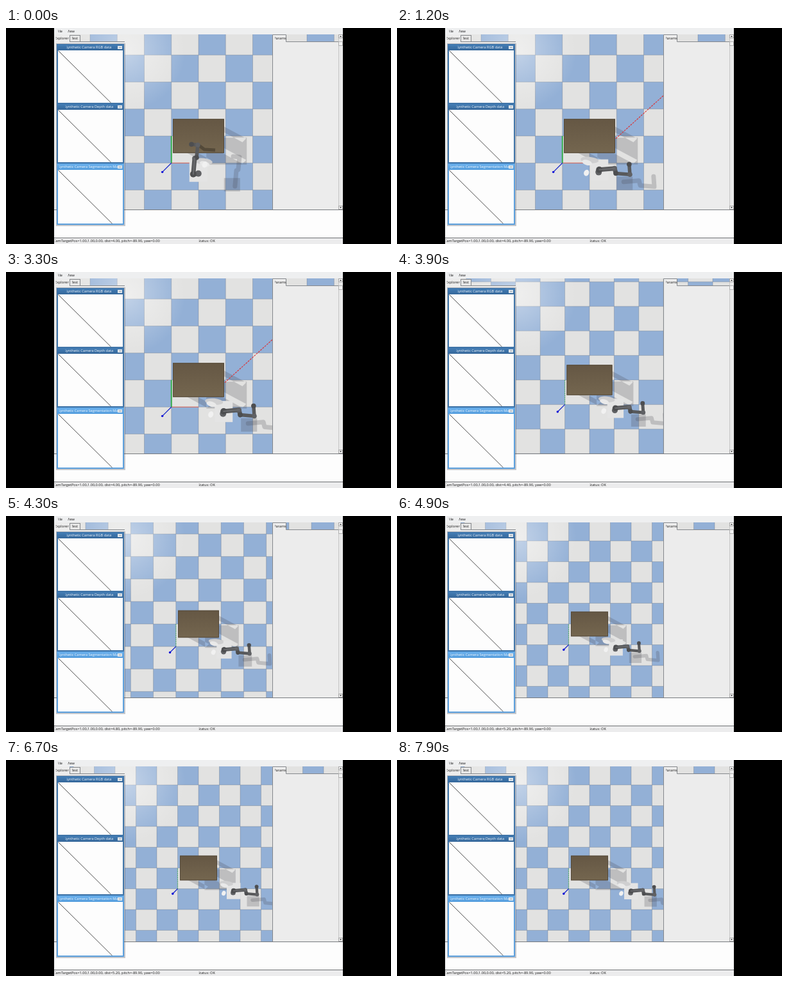
An HTML page with a canvas that plays this animation: 600x338 px, repeating every 8000 ms.

```html
<!DOCTYPE html>
<html lang="en">
<head>
<meta charset="utf-8">
<title>Robot simulation viewer</title>
<style>
html, body { margin: 0; width: 100%; height: 100%; overflow: hidden; background: #000; }
canvas { display: block; width: 600px; height: 338px; }
</style>
</head>
<body>
<canvas id="stage" width="600" height="338"></canvas>
<script>
const ctx = document.getElementById('stage').getContext('2d');
const LOOP = 8000, STEP = 100;
const CX = 300, CY = 169, FOCAL = 169;
const FONT = '"Open Sans", "Noto Sans", sans-serif';
const SHADE = 'rgba(70,72,78,0.23)';

// time, ground x, ground y of the robot base
const PATH = [
  [0, 0.9, -0.39], [1200, 1.337, -0.34], [3300, 1.905, -0.25], [4300, 2.11, -0.23],
  [5400, 2.35, -0.2], [6700, 2.66, -0.19], [7900, 2.97, -0.2], [8000, 2.99, -0.2]
];
// arm segments: length and angle in degrees, folded up and swung out
const ARM_UP = [[8, -187], [25, -85], [3, -18], [20, -84], [10, -174]];
const ARM_OUT = [[4, -76], [24, -5], [8, 76], [22, 5], [16, -94]];

let dist = 4;

const mix = (a, b, k) => a + (b - a) * k;
const clamp = v => Math.max(0, Math.min(1, v));

// looking straight down at ground point (1, 1)
function project(x, y, z = 0) {
  const s = FOCAL / (dist - z);
  return [CX + (x - 1) * s, CY - (y - 1) * s];
}

function rect(x, y, w, h, color) {
  ctx.fillStyle = color;
  ctx.fillRect(x, y, w, h);
}

function frame(x, y, w, h, color) {
  ctx.strokeStyle = color;
  ctx.lineWidth = 1;
  ctx.strokeRect(x + 0.5, y + 0.5, w - 1, h - 1);
}

function line(pts, color, width = 1, dash = []) {
  ctx.beginPath();
  pts.forEach(p => ctx.lineTo(p[0], p[1]));
  ctx.strokeStyle = color;
  ctx.lineWidth = width;
  ctx.setLineDash(dash);
  ctx.stroke();
  ctx.setLineDash([]);
}

function ellipse(x, y, rx, ry, color, turn = 0) {
  ctx.beginPath();
  ctx.ellipse(x, y, rx, ry, turn, 0, Math.PI * 2);
  ctx.fillStyle = color;
  ctx.fill();
}

// the toolkit cuts off the left part of the first letter
function label(str, x, y, color = '#1c1c1c', right = 525) {
  ctx.font = '5.6px ' + FONT;
  const first = ctx.measureText(str[0]).width;
  ctx.save();
  ctx.beginPath();
  ctx.rect(x - first * 0.45, y - 8, right - x + first, 12);
  ctx.clip();
  ctx.fillStyle = color;
  ctx.fillText(str, x - first, y);
  ctx.restore();
}

function zoomAt(t) {
  return Math.round(mix(4, 5.2, clamp((t - 3500) / 1200)) * 10) / 10;
}

function baseAt(t) {
  const i = PATH.findIndex((p, n) => n && t <= p[0]);
  const a = PATH[i - 1], b = PATH[i], k = (t - a[0]) / (b[0] - a[0]);
  return [mix(a[1], b[1], k), mix(a[2], b[2], k)];
}

function armPoints(k) {
  let x = mix(4, 0, k), y = 0;
  const pts = [[x, y]];
  ARM_UP.forEach((up, i) => {
    const len = mix(up[0], ARM_OUT[i][0], k);
    const a = mix(up[1], ARM_OUT[i][1], k) * Math.PI / 180;
    x += len * Math.cos(a);
    y += len * Math.sin(a);
    pts.push([x, y]);
  });
  return pts;
}

function drawFloor() {
  const s = FOCAL / dist;
  rect(75, 10, 450, 275, '#e2e2e1');
  for (let i = -6; i < 9; i++) {
    for (let j = -3; j < 7; j++) {
      const [x, y] = project(i, j + 1);
      if ((i + j) % 2) rect(x, y, s, s, '#93b0d6');
    }
  }
  for (let n = -6; n < 9; n++) {
    const [x, y] = project(n, n);
    line([[x, 10], [x, 285]], 'rgba(80,90,105,0.4)', 0.7);
    line([[75, y], [525, y]], 'rgba(80,90,105,0.4)', 0.7);
  }
  const glow = ctx.createRadialGradient(185, 35, 0, 185, 35, 95);
  glow.addColorStop(0, 'rgba(255,255,255,0.45)');
  glow.addColorStop(1, 'rgba(255,255,255,0)');
  rect(75, 10, 220, 125, glow);
}

function drawTableShadow() {
  const s = FOCAL / dist;
  const [x, y] = project(1.29, 0.94);
  ctx.beginPath();
  ctx.rect(x, y, 1.49 * s, s);
  const w = 0.07;
  for (const lx of [0.35, 1.65]) {
    for (const ly of [0.6, 1.4]) {
      const quad = [[lx - w, ly - w], [lx + 1.04 - w, ly - 0.56 - w],
        [lx + 1.04 + w, ly - 0.56 + w], [lx + w, ly + w]];
      quad.forEach((q, i) => ctx[i ? 'lineTo' : 'moveTo'](...project(...q)));
      ctx.closePath();
    }
  }
  ctx.fillStyle = SHADE;
  ctx.fill();
}

function drawAxes() {
  const o = project(0, 0);
  const far = dist > 4;
  if (!far) line([o, project(1, 0)], '#dc6055', 1.2);
  line([o, project(0, 1)], far ? '#55b070' : '#35ad4c', far ? 1.2 : 2, far ? [2, 1.3] : []);
  const tip = project(0, 0, 1);
  line([o, tip], '#1020c8', 1.2);
  ellipse(tip[0], tip[1], 1.7, 1.7, '#0808d8');
}

function drawTable(k) {
  const [x, y] = project(0.25, 1.5, 0.83);
  const [r, b] = project(1.75, 0.5, 0.83);
  const wood = ctx.createLinearGradient(x, y, x, b);
  wood.addColorStop(0, '#655744');
  wood.addColorStop(1, '#74664f');
  rect(x, y, r - x, b - y, wood);
  frame(x, y, r - x, b - y, '#554938');
  if (k < 0.5) {
    line([[301, 184], [309, 190], [326, 191]], 'rgba(30,25,20,0.35)', 5);
  }
}

function drawRobotBody(k) {
  const off = mix(3, 0, k);
  rect(off - 13, -20, 28, 33, '#e4e4e4');
  ellipse(mix(12, -14, k), -19, 14, 5, '#cfcfd0', 0.1);
  ellipse(mix(14, -18, k), -15, 8, 4, '#e9e9e9', 0.3);
  ellipse(mix(14, -19, k), mix(-14, 1, k), 4, 5, '#f1f1f1', 0.4);
}

function drawRobotShadow(pts, k) {
  rect(mix(44, 28, k), 7, 25, 21, SHADE);
  const dx = mix(65, 38, k), dy = 19;
  line(pts.slice(1).map(p => [p[0] + dx, p[1] + dy]), SHADE, 7);
}

function drawArm(pts) {
  const dark = '#58595b';
  line(pts.slice(0, 4), dark, 7);
  line(pts.slice(3), dark, 5.5);
  pts.forEach((p, i) => ellipse(p[0], p[1], i < 2 ? 5 : 3.8, i < 2 ? 5 : 3.8, i % 2 ? '#4d4e50' : '#606164'));
  line(pts.slice(1, 3), '#6b6c6f', 2);
}

function drawScene(t) {
  const swing = clamp(t / 1100);
  const k = swing * swing * (3 - 2 * swing);
  const [bx, by] = project(...baseAt(t));
  const pts = armPoints(k);
  const local = draw => {
    ctx.save();
    ctx.translate(bx, by);
    ctx.scale(4 / dist, 4 / dist);
    ctx.lineCap = ctx.lineJoin = 'round';
    draw();
    ctx.restore();
  };
  ctx.save();
  ctx.beginPath();
  ctx.rect(75, 10, 450, 274);
  ctx.clip();
  drawFloor();
  drawTableShadow();
  local(() => drawRobotShadow(pts, k));
  drawAxes();
  local(() => drawRobotBody(k));
  if (t >= 600 && t < 3500) line([[341, 173], [416, 105]], '#d8383c', 1.2, [3, 1.4]);
  drawTable(k);
  local(() => drawArm(pts));
  ctx.restore();
}

function drawWindow(y, h, title, textX, active) {
  const edge = active ? '#5b9fdd' : '#3f74a8';
  rect(79, y, 105, h, edge);
  const bar = ctx.createLinearGradient(0, y, 0, y + 10);
  bar.addColorStop(0, active ? '#6db2ee' : '#447fb8');
  bar.addColorStop(1, active ? '#519bdc' : '#35679a');
  rect(80, y + 1, 103, 9, bar);
  rect(81, y + 10, 101, h - 12, '#fdfdfd');
  line([[81.5, y + 10.5], [81.5 + h - 12, y + h - 2]], '#3a3a3a', 0.9);
  label(title, textX, y + 7.3, '#f4f8fc', 172);
  rect(174, y + 3, 7, 5, '#dfe5ea');
  line([[176, y + 5.5], [179.5, y + 5.5]], '#9aa4ae', 1);
}

function arrow(x, y, dir) {
  rect(518, y - 3, 7, 6, '#f6f6f6');
  frame(518, y - 3, 7, 6, '#a8a8a8');
  ctx.beginPath();
  ctx.moveTo(x - 1.6, y + dir);
  ctx.lineTo(x + 1.6, y + dir);
  ctx.lineTo(x, y - dir);
  ctx.fillStyle = '#333';
  ctx.fill();
}

function drawPanels() {
  const face = '#ececec', border = '#85888c';
  rect(75, 0, 450, 10, '#eeeff0');
  label('File', 82, 7);
  label('View', 98, 7);

  rect(75, 21, 110, 264, face);
  rect(75, 10, 24, 12, face);
  rect(99, 11, 17, 10, '#e8e8e8');
  frame(99, 11, 17, 11, border);
  line([[99, 21.5], [185, 21.5]], border);
  label('Explorer', 79, 17.5);
  label('Test', 104.5, 18);

  rect(415, 21, 110, 264, face);
  rect(415, 10, 22, 12, face);
  line([[415.5, 285], [415.5, 10.5], [436.5, 10.5], [436.5, 21.5], [518, 21.5]], border);
  label('Params', 420.5, 17.5);
  rect(518, 10, 7, 274, '#e9e9e9');
  line([[518.5, 10], [518.5, 284]], '#c6c6c6');
  arrow(521.5, 13, 1);
  arrow(521.5, 281, -1);
  rect(518, 21, 7, 7, '#f4f4f4');
  frame(518, 21, 7, 7, '#b0b0b0');

  rect(75, 284, 450, 44, '#fdfdfd');
  line([[75, 284.5], [525, 284.5]], '#777a7e');
  rect(75, 328, 450, 10, '#ececed');
  line([[75, 328.5], [525, 328.5]], '#6e7073');
  label(`CamTargetPos=1.00,1.00,0.00, dist=${dist.toFixed(2)}, pitch=-89.90, yaw=0.00`, 77.5, 334.5);
  label('Status: OK', 302, 334.5);

  rect(78, 24, 108, 286, 'rgba(50,60,75,0.28)');
  drawWindow(25, 94, 'Synthetic Camera RGB data', 96, false);
  drawWindow(118, 94, 'Synthetic Camera Depth data', 94, false);
  drawWindow(212, 96, 'Synthetic Camera Segmentation Mask', 84.5, true);
}

function render(now) {
  const t = Math.floor((now % LOOP) / STEP) * STEP;
  dist = zoomAt(t);
  rect(0, 0, 600, 338, '#000');
  drawScene(t);
  ctx.save();
  ctx.beginPath();
  ctx.rect(75, 0, 450, 338);
  ctx.clip();
  drawPanels();
  ctx.restore();
}

const start = performance.now();
function tick() {
  render(performance.now() - start);
  requestAnimationFrame(tick);
}
tick();
</script>
</body>
</html>
```
